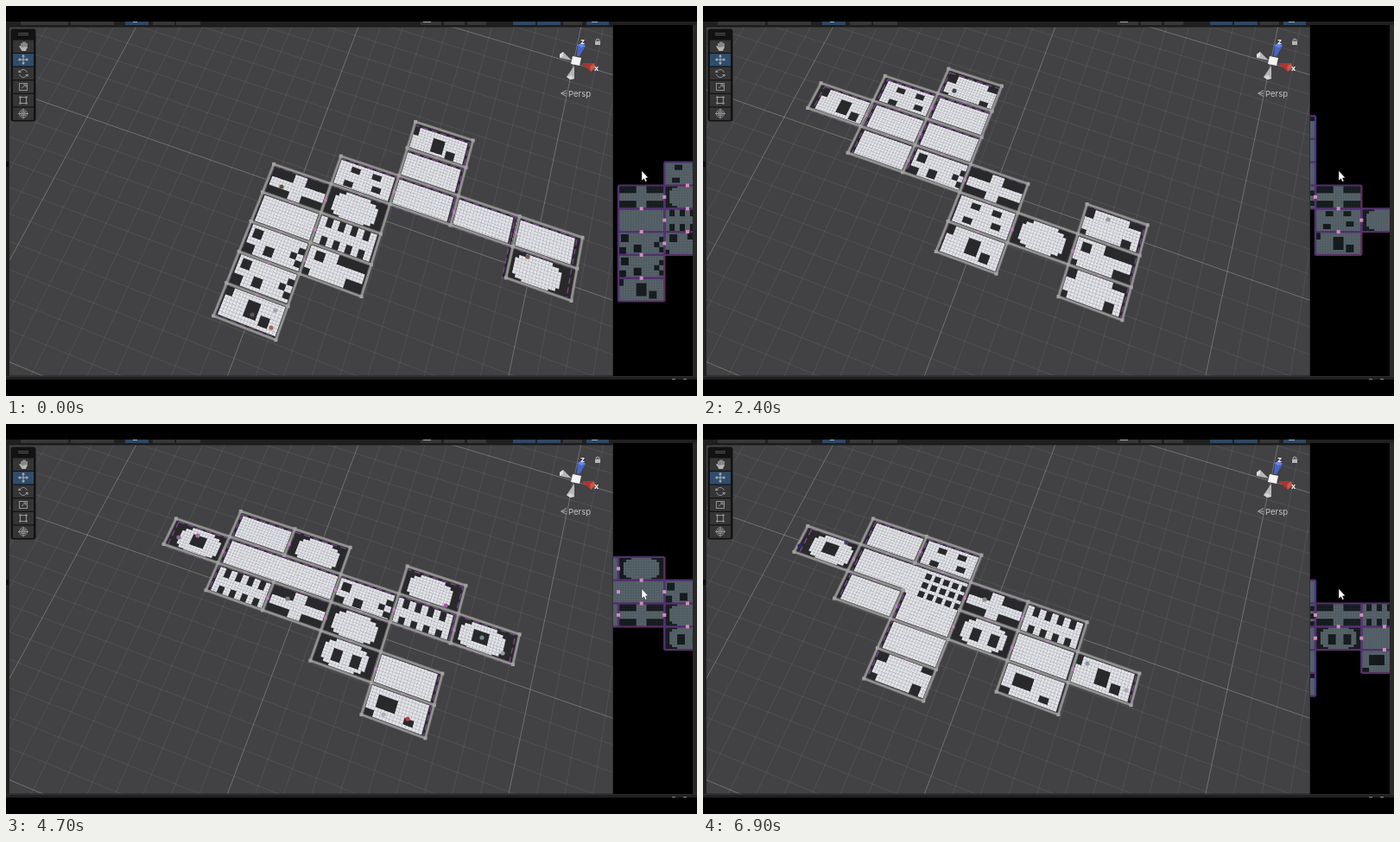
Animation of 800 by 451 pixels, one loop 7000 ms. Source, as an HTML page with a canvas:

```html
<!DOCTYPE html>
<html lang="en">
<head>
<meta charset="utf-8">
<title>Dungeon generator</title>
<style>
  html, body { margin: 0; width: 100%; height: 100%; overflow: hidden; background: #000; }
  canvas { display: block; width: 800px; height: 451px; }
</style>
</head>
<body>
<canvas id="stage" width="800" height="451"></canvas>
<script>
const ctx = document.getElementById('stage').getContext('2d');
const LOOP = 7000, COLS = 18, ROWS = 9;
const ROOM_W = 0.262, ROOM_H = 0.132;
const NADIR = [353, 296], DEPTH = 0.02;

// Floor rules: true where a tile is missing.
const box = (l, t, w, h) => (x, y) => x >= l && x < l + w && y >= t && y < t + h;
const any = (...rules) => (x, y) => rules.some(r => r(x, y));
const round = (x, y) => Math.abs(x - 8.5) / 2 + Math.abs(y - 4) > 5.8 || Math.abs(x - 8.5) > 7;
const plain = () => false;
const FLOORS = {
  P: plain, p: plain,
  X: (x, y) => Math.abs(y - 4) > 1.5 && Math.abs(x - 8.5) > 2,
  O: round,
  W: any(round, box(5, 3, 3, 4), box(11, 3, 3, 4)),
  K: any(round, box(6, 2, 5, 4)),
  B: any(box(7, 2, 4, 5), box(12, 5, 3, 3), box(0, 0, 2, 3)),
  R: any(box(3, 2, 6, 4), box(12, 6, 3, 2), box(0, 7, 3, 2)),
  F: any(box(4, 1, 3, 2), box(11, 1, 3, 2), box(3, 6, 3, 2), box(12, 5, 3, 2)),
  S: (x, y) => (y < 3 || y > 5) && x % 4 > 1,
  C: any(box(1, 1, 3, 3), box(0, 6, 3, 3), box(6, 5, 3, 3),
    (x, y) => x > 13 && y > 1 && y < 8 && (x >> 1) + (y >> 1) & 1),
  T: any(box(2, 1, 3, 3), box(9, 0, 9, 3), box(13, 6, 5, 3), box(0, 7, 2, 2)),
  N: any(box(0, 0, 3, 3), box(14, 0, 4, 2), box(0, 7, 2, 2), box(13, 6, 3, 3)),
  G: (x, y) => x > 2 && x % 3 > 0 && y % 3 > 0
};

// Room maps: columns run from -3 to 4, rows start at -3; p opens right, G opens down.
const LEVELS = {
  a: { map: ['.....B..', '.....P..', '....FPPP', '...XO..O', '...PS...', '...CT...', '...C....', '...B....'],
    props: [[319, 209, '#65503f'], [285, 357, '#5d5450'], [307, 372, '#9b665a'], [604, 290, '#79564a'], [312, 352, '#a5a5a5']] },
  b: { map: ['........', '.....O..', '....TS..', '.TSXP...', '.OPPF...', '..K.PO..', '.....K..'],
    props: [[418, 366, '#8b8f92'], [470, 385, '#35308f'], [463, 388, '#4a4a50'], [216, 253, '#8d8195'], [257, 268, '#b5a4bb']] },
  c: { map: ['..N.....', '.FP.....', 'BPP.....', '.PCX.N..', '...FOT..', '...B.N..'],
    props: [[291, 98, '#444448'], [469, 247, '#9a9a9e']] },
  d: { map: ['........', '..PO.O..', '.KpPCSK.', '..SXO...', '....WP..', '.....R..'],
    props: [[465, 341, '#bd3d43'], [551, 247, '#78898c'], [575, 265, '#93a09f'], [200, 131, '#8d6b91'], [222, 129, '#9a749d'], [437, 336, '#aeb0b2'], [509, 210, '#a05aa0'], [326, 202, '#777b7e']] },
  e: { map: ['........', '........', '.PF.....', 'KpGXS...', '.PPWPB..', '..P.R...', '..N.....'],
    props: [[112, 141, '#2b2873'], [166, 137, '#463c68'], [326, 203, '#888d90'], [445, 277, '#87989a'], [490, 308, '#aaaeb0']] },
  gap1: { map: [], props: [[181, 122], [223, 136], [297, 128], [333, 288], [752, 274]] },
  gap2: { map: [], props: [[272, 189], [492, 194], [573, 258], [404, 236], [788, 221]] }
};
const STEPS = [[0, 'a'], [300, 'gap1'], [400, 'b'], [1900, 'gap2'], [2000, 'c'],
  [3500, 'gap1'], [3600, 'd'], [5400, 'gap2'], [5500, 'e']];

// Ground plane to screen.
function project(u, v) {
  const w = 1 - 0.0526 * u - 0.1448 * v;
  return [(238.05 * u - 142.5 * v + 337) / w, (77.84 * u + 218.8 * v + 213) / w];
}
const corner = (i, j) => project(-0.1348 + ROOM_W * i, -0.0748 + ROOM_H * j);
const quad = (l, t, r, b) => [corner(l, t), corner(r, t), corner(r, b), corner(l, b)];
// From wall top to floor level, towards the point right below the camera.
const sink = points => points.map(p => p.map((n, axis) => n + (NADIR[axis] - n) * DEPTH));

function path(points, closed = true) {
  ctx.beginPath();
  points.forEach(([x, y]) => ctx.lineTo(x, y));
  if (closed) ctx.closePath();
}
function fill(points, color) { path(points); ctx.fillStyle = color; ctx.fill(); }
function line(points, color, width = 1) {
  path(points, false);
  ctx.strokeStyle = color; ctx.lineWidth = width; ctx.stroke();
}
function rect(x, y, w, h, color) { ctx.fillStyle = color; ctx.fillRect(x, y, w, h); }
function dot(x, y, r, color) {
  ctx.beginPath(); ctx.arc(x, y, r, 0, 7);
  ctx.fillStyle = color; ctx.fill();
}
function clipped(x, y, w, h, draw) {
  ctx.save();
  ctx.beginPath(); ctx.rect(x, y, w, h); ctx.clip();
  draw();
  ctx.restore();
}

function drawGrid() {
  for (let k = -30; k <= 30; k++) {
    const color = k % 10 ? 'rgba(255,255,255,.075)' : 'rgba(205,205,200,.34)';
    line([project(k / 10, -2), project(k / 10, 2)], color);
    if (Math.abs(k) <= 20) line([project(-3, k / 10), project(3, k / 10)], color);
  }
}

function roomsOf({ map }) {
  const at = (i, j) => (map[j + 3] || '')[i + 3] || '.';
  const rooms = [];
  map.forEach((row, r) => [...row].forEach((kind, c) => {
    if (kind === '.') return;
    const i = c - 3, j = r - 3;
    rooms.push({ i, j, hole: FLOORS[kind],
      right: at(i + 1, j) !== '.', below: at(i, j + 1) !== '.',
      openRight: kind === 'p', openLeft: at(i - 1, j) === 'p',
      openBelow: kind === 'G', openAbove: at(i, j - 1) === 'G' });
  }));
  return rooms;
}

function drawBase({ i, j }) {
  const top = quad(i, j, i + 1, j + 1), base = sink(top);
  fill(base, '#29292c');
  fill(top, '#29292c');
  ctx.setLineDash([7, 4]);
  line([...base, base[0]], '#7b4590', 1.3);
  ctx.setLineDash([]);
}

function drawFloor({ i, j, hole, openLeft, openRight, openAbove, openBelow }) {
  const l = openLeft ? 0 : 0.03, r = openRight ? 1 : 0.97;
  const t = openAbove ? 0 : 0.04, b = openBelow ? 1 : 0.96;
  const w = (r - l) / COLS, h = (b - t) / ROWS;
  for (let y = 0; y < ROWS; y++) for (let x = 0; x < COLS; x++) {
    if (hole(x, y)) continue;
    const x0 = i + l + x * w, y0 = j + t + y * h;
    fill(sink(quad(x0, y0, x0 + w * 1.04, y0 + h * 1.04)), '#b4b6bb');
    fill(sink(quad(x0, y0, x0 + w * 0.88, y0 + h * 0.88)), '#e2e3e8');
  }
}

function drawWalls(room) {
  const { i, j } = room, [a, b, c, d] = quad(i, j, i + 1, j + 1);
  const sides = [[a, b, room.openAbove], [b, c, room.openRight], [c, d, room.openBelow], [d, a, room.openLeft]];
  for (const [color, width] of [['#555557', 4], ['#929290', 2.5]])
    for (const [p, q, open] of sides) if (!open) line([p, q], color, width);
  [a, b, c, d].forEach(([x, y]) => rect(x - 2, y - 2, 4, 4, '#a2a2a0'));
}

function drawDungeon(rooms) {
  rooms.forEach(drawBase);
  rooms.forEach(drawFloor);
  rooms.forEach(drawWalls);
  for (const { i, j, right, below, openRight, openBelow } of rooms) {
    if (right && !openRight) { const [x, y] = corner(i + 1, j + 0.55); rect(x - 1.5, y - 1.5, 3, 4, '#c67fc4'); }
    if (below && !openBelow) { const [x, y] = corner(i + 0.5, j + 1); rect(x - 2, y - 1, 4, 2, '#b98abb'); }
  }
}

function drawMinimap(rooms) {
  const W = 53.3, H = 26.8, left = i => 709 + W * i, top = j => 207.5 + H * j;
  for (const { i, j, hole } of rooms) {
    const x0 = left(i), y0 = top(j), w = W / COLS, h = H / ROWS;
    rect(x0, y0, W, H, '#4c575b');
    for (let y = 0; y < ROWS; y++) for (let x = 0; x < COLS; x++)
      if (hole(x, y)) rect(x0 + x * w, y0 + y * h, w + 0.2, h + 0.2, '#14191c');
      else rect(x0 + x * w, y0 + y * h, w - 0.4, h - 0.4, '#56636a');
  }
  for (const { i, j, openRight, openLeft } of rooms) {
    const x0 = left(i), y0 = top(j);
    line([[x0, y0], [x0 + W, y0]], '#51306f', 2.2);
    line([[x0, y0 + H], [x0 + W, y0 + H]], '#582e62', 2.2);
    if (!openLeft) line([[x0, y0], [x0, y0 + H]], '#543074', 2.4);
    if (!openRight) line([[x0 + W, y0], [x0 + W, y0 + H]], i < 0 ? '#4b3193' : '#5f2f5c', 2.4);
  }
  for (const { i, j, right, below } of rooms) {
    if (right) rect(left(i + 1) - 2, top(j + 0.5) - 2, 4, 4, '#d58bbd');
    if (below) rect(left(i + 0.5) - 2, top(j + 1) - 2, 4, 4, '#d58bbd');
  }
}

function drawTools() {
  ctx.beginPath(); ctx.roundRect(5.5, 26.5, 29, 107, 3);
  ctx.fillStyle = '#121213'; ctx.fill();
  rect(14, 31, 12, 1, '#555'); rect(14, 33, 12, 1, '#555');
  for (let k = 0; k < 6; k++) rect(8, 39.5 + k * 15.6, 24, 14.4, k === 1 ? '#304d6c' : '#353536');
  let ink = '#b4b4b4';
  const stroke = (...p) => line(p, ink);
  // hand
  fill([[15, 46.5], [16.5, 46], [18, 48], [23.5, 47], [24.5, 48], [23, 52], [18.5, 52]], ink);
  for (let x = 18; x < 25; x += 2) line([[x, x === 18 || x === 24 ? 43 : 41.5], [x, 49]], ink, 1.3);
  // move
  stroke([15, 62], [25, 62]); stroke([20, 57], [20, 67]);
  for (const [dx, dy] of [[1, 0], [-1, 0], [0, 1], [0, -1]])
    fill([[20 + 6 * dx, 62 + 6 * dy], [20 + 3.5 * dx + 2 * dy, 62 + 3.5 * dy + 2 * dx],
      [20 + 3.5 * dx - 2 * dy, 62 + 3.5 * dy - 2 * dx]], ink);
  // rotate
  ink = '#939393';
  ctx.strokeStyle = ink;
  for (const from of [0.4, 3.5]) { ctx.beginPath(); ctx.arc(20, 78, 4.5, from, from + 2.5); ctx.stroke(); }
  fill([[14, 77], [18, 77], [15, 74]], ink); fill([[22, 79], [26, 79], [25, 82]], ink);
  // scale, rect, transform
  ctx.strokeRect(15.5, 89.5, 9, 8); stroke([18, 95], [23, 91]); stroke([20, 91], [23, 91], [23, 94]);
  ctx.strokeRect(16.5, 105.5, 7, 7);
  for (const x of [16.5, 23.5]) for (const y of [105.5, 112.5]) dot(x, y, 1.3, ink);
  ctx.beginPath(); ctx.arc(20, 124.5, 4.5, 0, 7); ctx.stroke();
  ctx.strokeRect(18, 122.5, 4, 4); stroke([14, 124.5], [26, 124.5]); stroke([20, 118.5], [20, 130.5]);
}

function label(text, x, y, font, color) {
  ctx.font = font; ctx.fillStyle = color; ctx.fillText(text, x, y);
}

function drawGizmo() {
  fill([[661, 58], [662, 45], [666, 43], [671, 46], [664, 58]], '#4665c9');
  fill([[662, 45], [666, 43], [671, 46], [666, 48]], '#6688ef');
  fill([[666, 66], [681, 66], [682, 71], [677, 76]], '#a93632');
  fill([[681, 66], [682, 71], [677, 76], [676, 70]], '#ce5549');
  fill([[655, 63], [641, 60], [641, 56], [645, 53]], '#b7b7b7');
  fill([[641, 60], [641, 56], [645, 53], [645, 58]], '#dedede');
  fill([[658, 69], [649, 82], [653, 85], [658, 84]], '#b5b5b5');
  fill([[649, 82], [653, 85], [658, 84], [654, 80]], '#d7d7d7');
  fill([[656, 58], [666, 60], [664, 69], [654, 67]], '#f3f3f3');
  label('z', 665, 44, 'bold 9px Inter, sans-serif', '#eee');
  label('x', 681, 74.5, 'bold 9px Inter, sans-serif', '#eee');
  rect(682, 40.5, 6, 4.5, '#b6b6b6');
  ctx.beginPath(); ctx.arc(685, 40, 2, Math.PI, 0);
  ctx.strokeStyle = '#b6b6b6'; ctx.lineWidth = 1; ctx.stroke();
  line([[649, 97.5], [642.5, 101], [649, 104.5]], '#aaa');
  line([[643, 101], [649, 101]], '#aaa');
  label('Persp', 651, 104.7, '9.5px Inter, sans-serif', '#c4c4c4');
}

function drawFrame() {
  rect(0, 18, 800, 414, '#202021');
  for (const [x, w, blue] of [[17, 55], [75, 50], [138, 27, 1], [170, 25], [197, 28], [480, 24], [507, 24],
    [534, 22], [587, 26, 1], [615, 27, 1], [645, 22], [672, 26, 1]])
    rect(x, 18, w, 4, blue ? '#304762' : '#373738');
  rect(483, 18, 9, 1, '#aaa'); rect(678, 18, 7, 1, '#9bb3cc'); rect(147, 18, 5, 1, '#9bb3cc');
  rect(0, 23, 703, 1, '#18181a');
  rect(703, 22, 92, 406, '#000');
  rect(795, 22, 5, 406, '#29292a');
  rect(0, 180, 3, 6, '#0c0c0d');
  rect(0, 428, 800, 1, '#303031');
  rect(771, 431, 4, 1, '#8a8a8a'); rect(784, 431, 4, 1, '#8a8a8a');
}

function drawCursor() {
  const arrow = [[736, 190.5], [736, 202], [738.6, 199.7], [740.2, 203.2], [742, 202.4], [740.5, 199], [743.5, 198.5]];
  fill(arrow, '#fff');
  path(arrow); ctx.strokeStyle = '#222'; ctx.lineWidth = 0.5; ctx.stroke();
}

function draw(name) {
  const level = LEVELS[name], rooms = roomsOf(level);
  rect(0, 0, 800, 451, '#000');
  drawFrame();
  clipped(4, 24.5, 698.5, 403, () => {
    rect(4, 24, 699, 404, '#424143');
    drawGrid();
    drawDungeon(rooms);
  });
  clipped(703, 22, 92, 406, () => drawMinimap(rooms));
  for (const [x, y, color] of level.props) dot(x, y, color ? 2.6 : 0.9, color || (x > 703 ? '#444' : '#969696'));
  drawTools();
  drawGizmo();
  drawCursor();
}

let shown;
function tick() {
  const t = performance.now() % LOOP;
  const name = STEPS.filter(([start]) => start <= t).pop()[1];
  if (name !== shown) draw(shown = name);
  requestAnimationFrame(tick);
}
tick();
</script>
</body>
</html>
```
